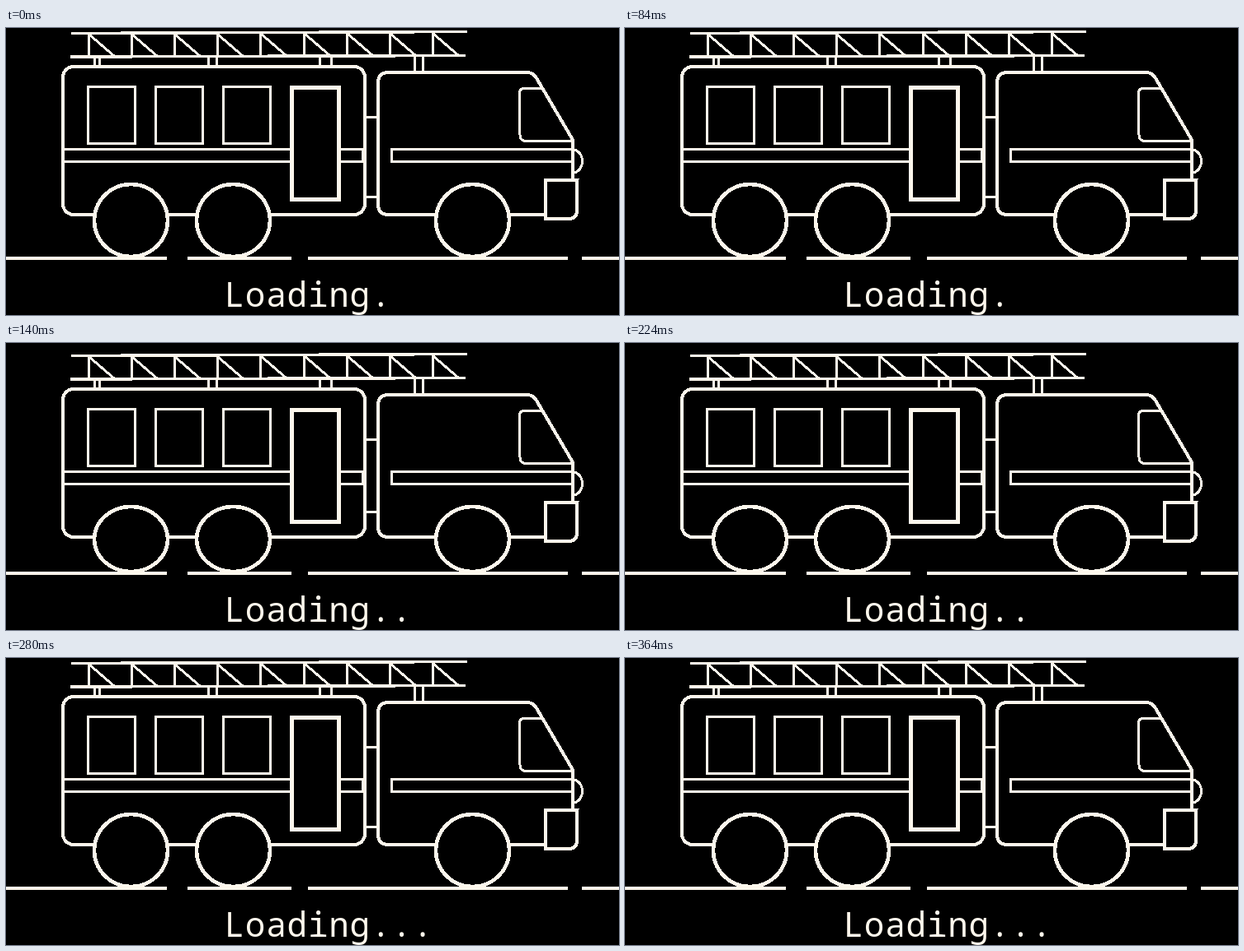
An HTML page that plays this animation: 743 by 349 pixels, repeating every 420 ms.

```html
<!DOCTYPE html>
<html lang="en">
<head>
<meta charset="utf-8">
<title>Loading</title>
<style>
  html, body { margin: 0; width: 100%; height: 100%; overflow: hidden; background: #000; }
  svg { display: block; width: 743px; height: 349px; }
  .line { fill: none; stroke: #fdf7ec; stroke-width: 4; shape-rendering: crispEdges; }
  .thin { stroke-width: 3; }
  text {
    font: 500 41px "Noto Sans Mono", "DejaVu Sans Mono", monospace;
    letter-spacing: 0.75px;
    fill: #fdf7ec;
  }

  .truck, .wheel, .dot { animation: 420ms step-end infinite; }
  .truck { animation-name: bounce; }
  .wheel { fill: #000; stroke-width: 4.5; rx: 44.5px; ry: 44px; cy: 234px; animation-name: squash; }
  .second { animation-name: second; }
  .third { animation-name: third; }

  @keyframes bounce {
    0%, 66.666% { transform: none; }
    33.333% { transform: translateY(9px); }
  }
  @keyframes squash {
    0%, 66.666% { cy: 234px; ry: 44px; }
    33.333% { cy: 238.5px; ry: 39.5px; }
  }
  @keyframes second {
    0% { fill: transparent; }
    33.333%, 100% { fill: #fdf7ec; }
  }
  @keyframes third {
    0% { fill: transparent; }
    66.666%, 100% { fill: #fdf7ec; }
  }
</style>
</head>
<body>
<svg viewBox="0 0 743 349">
  <defs>
    <path id="rung" d="M100.5 7V35M101 8L131 34"/>
    <rect id="pane" x="99.5" y="71.5" width="57" height="69"/>
  </defs>

  <g class="line">
    <path class="thin" d="M436 205H450"/>
    <g class="truck">
      <!-- ladder -->
      <g class="thin">
        <path d="M79 6.5L559 4.5M78 35L557 33.5" stroke-width="3.5"/>
        <use href="#rung"/>
        <use href="#rung" x="52"/>
        <use href="#rung" x="104"/>
        <use href="#rung" x="156"/>
        <use href="#rung" x="208" y="-1"/>
        <use href="#rung" x="261" y="-1"/>
        <use href="#rung" x="313" y="-1"/>
        <use href="#rung" x="365" y="-1"/>
        <use href="#rung" x="417" y="-1"/>
        <path d="M107 35V46M113 35V46M245 35V46M255 35V46M380 35V46M394 35V46M495 34V53M505 34V53"/>
      </g>

      <!-- body -->
      <rect x="69" y="47" width="366" height="180" rx="13"/>
      <g class="thin">
        <use href="#pane"/>
        <use href="#pane" x="82"/>
        <use href="#pane" x="164"/>
        <path d="M70 147.5H346M70 162.5H346M404 147.5H432.5V162.5H404"/>
        <path d="M436 108.5H450"/>
      </g>
      <rect x="346" y="72" width="57.5" height="136.5" stroke-width="5"/>

      <!-- cab -->
      <path d="M654 227H464Q451 227 451 214V67Q451 54 464 54H631Q639 54 643 61L687 136V184"/>
      <path class="thin" d="M649 73H629Q622 73 622 81L623 130Q623 137.5 631 137.5H687M687 147.5H467.5V162.5H687"/>
      <path class="thin" d="M687 148A11.5 14 0 0 1 687 176"/>
      <path d="M654 185H692.5L692 223Q691.5 232 682 232H654Z"/>
    </g>

    <ellipse class="wheel" cx="151.5"/>
    <ellipse class="wheel" cx="275.5"/>
    <ellipse class="wheel" cx="565.5"/>
    <path d="M0 280H195M220 280H346M366 280H681M698 280H743"/>
  </g>

  <text x="264.5" y="339">Loading.<tspan class="dot second">.</tspan><tspan class="dot third">.</tspan></text>
</svg>
</body>
</html>
```
